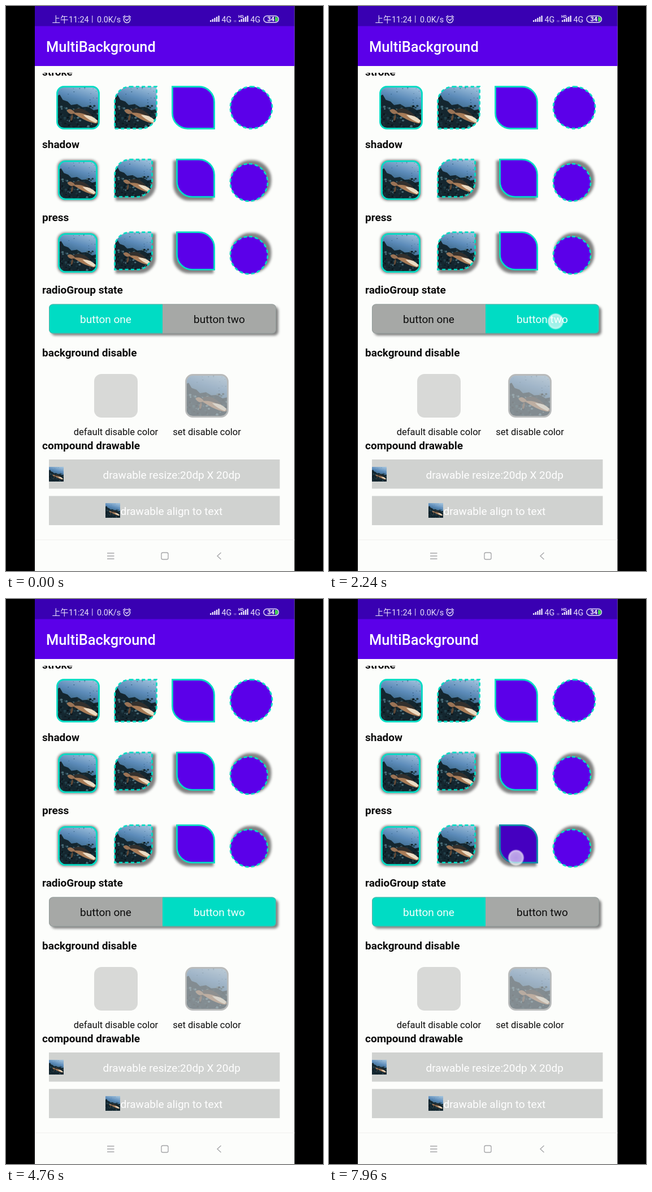
An HTML page that plays this animation: 561x998 px, repeating every 8 s.

```html
<!DOCTYPE html>
<html lang="en">
<head>
<meta charset="utf-8">
<title>MultiBackground</title>
<style>
  html, body { margin: 0; width: 100%; height: 100%; overflow: hidden; background: #000; }
  svg { display: block; width: 561px; height: 998px; }
  text { font-family: Roboto, sans-serif; font-size: 19px; fill: #0c0c0c; white-space: pre; }
  .head { font-weight: 700; }
  .title { font-size: 25.4px; font-weight: 500; fill: #fff; }
  .label { font-size: 16.5px; }
  .bar { fill: #fff; }
  .status text { font-size: 14.3px; fill: #e9e2fa; }
  .status .cjk { font-family: "Noto Sans CJK SC", "Noto Sans CJK", sans-serif; font-size: 14.6px; }
  .mid { text-anchor: middle; }
</style>
</head>
<body>
<svg id="stage" viewBox="0 0 561 998" xmlns="http://www.w3.org/2000/svg"></svg>
<script>
const LOOP = 8000;
const PURPLE = '#5b00e9', TEAL = '#00dcc4', GRAY = '#a6a8a6';
const stage = document.getElementById('stage');
let clips = 0;

let seed = 11;
const rnd = () => (seed = (seed * 16807) % 2147483647) / 2147483647;

const text = (x, y, s, cls = '') => `<text x="${x}" y="${y}" class="${cls}">${s}</text>`;
const box = (x, y, w, h, fill, r = 0) =>
  `<rect x="${x}" y="${y}" width="${w}" height="${h}" rx="${r}" fill="${fill}"/>`;

// Rounded box with its own radius per corner: tl, tr, br, bl.
function shape(x, y, s, [a, b, c, d]) {
  const arc = (r, dx, dy) => r ? `a${r} ${r} 0 0 1 ${dx * r} ${dy * r}` : '';
  return `M${x + a} ${y}H${x + s - b}${arc(b, 1, 1)}V${y + s - c}${arc(c, -1, 1)}` +
    `H${x + d}${arc(d, -1, -1)}V${y + a}${arc(a, 1, -1)}Z`;
}

const photo = (x, y, s) => `<use href="#photo" x="${x}" y="${y}" width="${s}" height="${s}"/>`;

// Outer box x, y, s; the line lies just inside of it.
function tile({ x, y, s, r, pic, dash, shadow, line = TEAL, veil, press }) {
  const d = shape(x + 1.5, y + 1.5, s - 3, r);
  let out = '';
  if (shadow) {
    out += `<path d="${shape(x, y, s, r)}" transform="translate(${shadow})" fill="#6c6c6c"
      stroke="#6c6c6c" stroke-width="2" opacity=".85" filter="url(#soft)"/>`;
  }
  if (pic) {
    const id = 'clip' + clips++;
    out += `<clipPath id="${id}"><path d="${d}"/></clipPath><g clip-path="url(#${id})">${photo(x, y, s)}</g>`;
  } else {
    out += `<path d="${d}" fill="${PURPLE}"/>`;
  }
  if (veil) out += `<path d="${d}" fill="#ced1d3" opacity=".6"/>`;
  out += `<path d="${d}" fill="none" stroke="${line}" stroke-width="2.8"${dash ? ' stroke-dasharray="6 4.4"' : ''}/>`;
  if (press) out += `<path id="${press}" d="${shape(x, y, s, r)}" fill="#200078" opacity="0"/>`;
  return out;
}

const ROUND = [12, 12, 12, 12], LEAF = [27, 0, 27, 0], DROP = [0, 27, 0, 27];
const circle = s => Array(4).fill((s - 3) / 2);

const plainRow = y =>
  tile({ x: 89, y, s: 77, r: ROUND, pic: 1 }) +
  tile({ x: 191, y, s: 77, r: LEAF, pic: 1, dash: 1 }) +
  tile({ x: 293, y, s: 77, r: DROP }) +
  tile({ x: 395.5, y, s: 77, r: circle(77), dash: 1 });

const shadowRow = (y, live) =>
  tile({ x: 92, y: y + 3, s: 70, r: ROUND, pic: 1, shadow: '0 0' }) +
  tile({ x: 191, y, s: 69, r: LEAF, pic: 1, dash: 1, shadow: '4 4' }) +
  tile({ x: 301, y, s: 69, r: DROP, shadow: '-4 4', press: live && 'dropPress' }) +
  tile({ x: 395.5, y: y + 7.5, s: 69, r: circle(69), dash: 1, shadow: '4 -4', press: live && 'ringPress' });

function scatter(n, top, height, size, flat, colors) {
  let out = '';
  for (let i = 0; i < n; i++) {
    const x = rnd() * 100, y = top + rnd() * height, r = size * (.4 + rnd() * .6);
    out += `<ellipse cx="${x.toFixed(1)}" cy="${y.toFixed(1)}" rx="${r.toFixed(1)}" ry="${(r * flat).toFixed(1)}"
      fill="${colors[i % colors.length]}"/>`;
  }
  return out;
}

const scenery = () =>
  '<rect width="100" height="100" fill="url(#sea)"/>' +
  '<path d="M0 24L8 20 15 32 26 36 34 44 48 42 60 49 74 48 86 56 100 53V100H0Z" fill="#14262f"/>' +
  scatter(110, 46, 54, 3.4, .8, ['#0a141a', '#22404b', '#4a6c78', '#0d1c23', '#1b323b']) +
  scatter(18, 4, 36, 1.7, .5, ['#2d5878']) +
  '<path d="M32 62Q42 50 56 52 74 56 88 76 70 78 50 70Z" fill="#33302d"/>' +
  '<path d="M38 62Q58 60 72 68 86 72 96 82 95 87 88 86 70 82 54 72Z" fill="#a87c58"/>' +
  '<path d="M62 67Q82 66 95 80L91 85Q74 79 62 67Z" fill="#ecdcc4"/>' +
  '<path d="M24 56Q31 50 39 57L44 63 34 65Q25 62 24 56Z" fill="#9a7355"/>' +
  '<path d="M37 64Q41 74 34 81 30 75 37 64Z" fill="#614937"/>';

const defs = `<defs>
  <linearGradient id="sea" x1=".7" x2=".4" y2="1">
    <stop stop-color="#9dbfdb"/><stop offset=".3" stop-color="#5d8cba"/><stop offset=".6" stop-color="#33607f"/>
  </linearGradient>
  <radialGradient id="glow">
    <stop stop-color="#fff" stop-opacity=".6"/><stop offset=".6" stop-color="#fff" stop-opacity=".64"/>
    <stop offset=".82" stop-color="#fff" stop-opacity=".74"/><stop offset="1" stop-color="#fff" stop-opacity="0"/>
  </radialGradient>
  <filter id="soft" x="-20%" y="-20%" width="140%" height="140%"><feGaussianBlur stdDeviation="2"/></filter>
  <clipPath id="scroll"><rect x="51" y="118" width="460" height="820"/></clipPath>
  <clipPath id="pill"><rect x="76" y="526.5" width="402" height="52" rx="7"/></clipPath>
  <symbol id="photo" viewBox="0 0 100 100">${scenery()}</symbol>
</defs>`;

const bars = x => [3, 5, 7, 9, 11].map((h, i) => box(x + i * 3.6, 28 - h, 2.4, h, '#e9e2fa', .6)).join('');

const status = `<g class="status">
  ${box(51, 0, 459.5, 35.5, '#3900b2')}
  ${text(81.5, 28.5, '上午', 'cjk') + text(111, 28.5, '11:24') + text(151, 28, '|') + text(161, 28.5, '0.0K/s')}
  <g fill="none" stroke="#e9e2fa" stroke-width="1.4" stroke-linecap="round">
    <circle cx="214" cy="24" r="5.6"/><path d="M211.5 23.5L213.8 25.7 217 22.5M207.5 19.5L210.5 17M220.5 19.5L217.5 17"/>
    <path d="M404.2 28V25.5M406.6 28V25.5" stroke-width="1" opacity=".6"/>
    <rect x="456" y="17.5" width="26.5" height="11.5" rx="5.7"/>
  </g>
  ${bars(361) + text(381.5, 28.5, '4G') + bars(412) + text(432.5, 28.5, '4G')}
  <text x="411" y="21" style="font-size:7px;font-weight:700">HD</text>
  <path d="M476 19.2H477.5A4 4 0 0 1 477.5 27.3H476Z" fill="#42cf52"/>
  <text x="462.5" y="27.2" style="font-size:11px;font-weight:700;fill:#fff">34</text>
</g>`;

function radio(id, first) {
  const half = (x, on, s) => box(x, 526, 201, 53, on ? TEAL : GRAY) +
    `<text x="${x + 100.5}" y="559.5" class="mid" style="fill:${on ? '#f4fffd' : '#0c0c0c'}">${s}</text>`;
  return `<g id="${id}" clip-path="url(#pill)">${half(76, first, 'button one')}${half(277, !first, 'button two')}</g>`;
}

const content = `<g clip-path="url(#scroll)">
  ${text(64, 122.5, 'stroke', 'head')}${plainRow(141)}
  ${text(64, 251, 'shadow', 'head')}${shadowRow(269.7)}
  ${text(64, 379.5, 'press', 'head')}${shadowRow(398.2, true)}
  ${text(64, 508, 'radioGroup state', 'head')}
  <rect x="77" y="528" width="402" height="51" rx="7" transform="translate(3 3)" fill="#6c6c6c" opacity=".85" filter="url(#soft)"/>
  ${radio('one', true)}${radio('two', false)}
  <rect x="76.5" y="527" width="401" height="51" rx="6.5" fill="none" stroke="#8c9a98" opacity=".7"/>
  ${text(64, 619, 'background disable', 'head')}
  ${box(156, 650, 77, 77, '#d8d9d7', 13)}
  ${tile({ x: 317, y: 650, s: 77, r: ROUND, pic: 1, veil: 1, line: '#b9bbbb' })}
  ${text(194.5, 757.5, 'default disable color', 'label mid')}${text(355.5, 757.5, 'set disable color', 'label mid')}
  ${text(64, 782.5, 'compound drawable', 'head')}
  ${box(76, 801, 408.5, 51.5, '#d0d2d0')}${photo(76, 814, 26)}${text(171.5, 834.5, 'drawable resize:20dp X 20dp', 'bar')}
  ${box(76, 865.5, 408.5, 51.5, '#d0d2d0')}${photo(176, 878, 26)}${text(202.5, 898.5, 'drawable align to text', 'bar')}
</g>`;

const nav = `${box(51, 942.5, 459.5, 1, '#eff0ee')}
<g fill="none" stroke="#a3a4a6" stroke-width="1.3">
  <path d="M179 966.5H191.5M179 971.5H191.5M179 976.5H191.5"/>
  <rect x="275" y="965.5" width="12" height="12" rx="2.6"/>
  <path d="M380.5 965.5L374 971.5 380.5 977.5"/>
</g>`;

// x, y, finger down, finger up, faded out
const taps = [
  [401, 557, 720, 1440, 1660],
  [401, 557, 1840, 2300, 2560],
  [185, 556, 2920, 3480, 3720],
  [401, 557, 4000, 4480, 4760],
  [185, 556, 5120, 5440, 5720],
  [455, 447, 6240, 6400, 6600],
  [455, 447, 6760, 6880, 7080],
  [331, 457, 7240, 7360, 7560],
  [331, 457, 7680, LOOP, LOOP]
];
const dots = taps.map(([x, y], i) =>
  `<circle id="tap${i}" cx="${x}" cy="${y}" r="15" fill="url(#glow)" opacity="0"/>`).join('');

stage.innerHTML = defs + box(51, 0, 459.5, 998, '#fcfdfb') + content +
  box(51, 35, 459.5, 71, PURPLE) + text(71, 80.5, 'MultiBackground', 'title') + status + nav + dots;

// Steps are [time, opacity]; equal times make a hard change.
function track(id, steps) {
  const all = [[0, steps[0][1]], ...steps, [LOOP, steps[steps.length - 1][1]]];
  document.getElementById(id).animate(
    all.map(([t, v]) => ({ offset: t / LOOP, opacity: v })),
    { duration: LOOP, iterations: Infinity });
}

taps.forEach(([, , down, up, end], i) =>
  track('tap' + i, [[down, 0], [down, 1], [up, 1], ...(up < LOOP ? [[end, 0]] : [])]));

const flips = [1480, 3520, 4520, 5480];
const flipSteps = start => flips.flatMap((t, i) => {
  const v = (start + i) % 2;
  return [[t, v], [t, 1 - v]];
});
track('one', flipSteps(1));
track('two', flipSteps(0));

// Each press is [starts, let go, gone].
const pressSteps = list => list.flatMap(([start, up, end]) =>
  [[start, 0], [Math.min(start + 170, up), .36], [up, .36], [end, 0]]);
track('ringPress', pressSteps([[6350, 6470, 6600], [6870, 6960, 7080]]));
track('dropPress', [...pressSteps([[7350, 7440, 7560]]), [7790, 0], [7960, .36]]);
</script>
</body>
</html>
```
